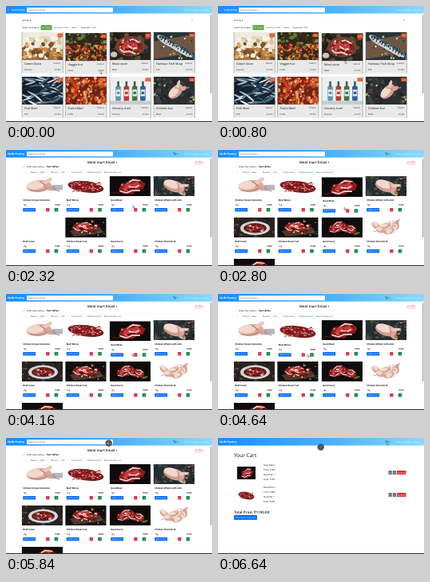
An HTML page for the animation above (8 s loop, 258 px wide and 146 px high).

```html
<!DOCTYPE html>
<html lang="en">
<head>
<meta charset="utf-8">
<title>Grocery shop demo</title>
<style>
html, body { margin: 0; width: 100%; height: 100%; overflow: hidden; background: #fff; }
svg { display: block; }
#stage { width: 100vw; height: 100vh; }
text { font-family: "Open Sans", "Noto Sans", sans-serif; text-rendering: geometricPrecision; }
</style>
</head>
<body>
<svg id="stage" viewBox="0 0 258 146"></svg>
<script>
const LOOP = 8000, STEP = 80;
const INK = '#101214', BLUE = '#0d6efd', RED = '#dc3545', GREEN = '#198754';

const rect = (x, y, w, h, fill, rx = 0, more = '') =>
  `<rect x="${x}" y="${y}" width="${w}" height="${h}" fill="${fill}" rx="${rx}" ${more}/>`;
const text = (x, y, size, str, fill = INK, more = '') =>
  `<text x="${x}" y="${y}" font-size="${size}" fill="${fill}" ${more}>${str}</text>`;
const oval = (x, y, rx, ry, fill, turn = 0) =>
  `<ellipse cx="${x}" cy="${y}" rx="${rx}" ry="${ry}" fill="${fill}" transform="rotate(${turn} ${x} ${y})"/>`;
const path = (d, fill, more = '') => `<path d="${d}" fill="${fill}" ${more}/>`;
const group = (id, body, more = '') => `<g id="${id}" ${more}>${body}</g>`;
const place = (x, y, k, turn, body) =>
  `<g transform="translate(${x} ${y}) rotate(${turn}) scale(${k})">${body}</g>`;
const END = 'text-anchor="end"', MID = 'text-anchor="middle"';
const BOLD = 'font-weight="700"', SEMI = 'font-weight="600"';

function scatter(seed, n, [x0, y0, x1, y1], size, colors, squash = 0.8, turn = 60) {
  const rnd = () => (seed = (seed * 16807) % 2147483647) / 2147483647;
  rnd();
  let out = '';
  for (let i = 0; i < n; i++) {
    const r = size * (0.6 + rnd() * 0.6);
    out += oval((x0 + rnd() * (x1 - x0)).toFixed(1), (y0 + rnd() * (y1 - y0)).toFixed(1),
      r.toFixed(1), (r * squash).toFixed(1), colors[i % colors.length], Math.round((rnd() - 0.5) * turn));
  }
  return out;
}

// Pictures are painted in a 50 x 30 box and stretched to their frame.
const back = fill => rect(0, 0, 50, 30, fill);
const FLESH = ['#e3b5aa', '#f4dcd3', '#d7a195', '#eecabf'];
const MEAT = ['#a32324', '#c8443c', '#5e1214', '#e8c4b8', '#7c1518'];
const bird = (x, y, k, turn = 0) => place(x, y, k, turn,
  oval(0, 0, 11, 6.5, '#d9aea0') + oval(-3, -1.5, 8, 4.5, '#f2d8cd') +
  oval(9, 3, 6, 2.8, '#d7a598', 25) + oval(8, -4.5, 5.5, 2, '#ebc8bc', -30) +
  path('M-9 3Q-1 7 7 3M1-5Q5-2 6 2M12 5L17 8', 'none', 'stroke="#bd8779" stroke-width="1"'));
const cut = (x, y, k, turn = 0) => place(x, y, k, turn,
  path('M-13 3L-9-5L-3-4L2-9L8-7L13-1L10 5L4 5L0 9L-9 8Z', '#8d1b1e') +
  path('M-9 2L-5-4L1-3L6-5L9 1L3 4L-2 2L-5 6Z', '#c23c38') +
  path('M-12 4L-6 7L0 5L7 6M-4-4L2-7L9-5M-3 0L3 2L7 0', 'none', 'stroke="#efd8d0" stroke-width="1.5"') +
  scatter(43, 10, [-9, -5, 9, 6], 1.2, ['#4e0e12', '#e6a59b', '#a32427']));
const striped = (x, y, k, turn) => place(x, y, k, turn,
  oval(0, 0, 14, 4, '#cfd6d8') + path('M-13-1Q0-8 13-1L18-4V4L12 0Z', '#47606f') +
  path('M-7-3V2M-3-4V2M1-4V2M5-4V2M9-3V1', 'none', 'stroke="#20323e" stroke-width="1.3"') +
  oval(-10, 0, 1, 1, '#111'));

const PICTURES = {
  pantry: () => back('#f0eadf') + rect(0, 17, 50, 13, '#a3713f') +
    scatter(5, 24, [3, 3, 48, 13], 2.6, ['#f9f5ea', '#d8c49d', '#e6d7b7', '#b8b078']) +
    scatter(21, 62, [1, 12, 49, 29], 2.7, ['#c78c45', '#efe3c8', '#84532b', '#dfb35e', '#f5efdf', '#6b4a2c']),
  veggies: () => back('#38251a') +
    scatter(8, 60, [0, 0, 50, 13], 2.2, ['#2c4023', '#5f7a36', '#1b2917', '#8c8752', '#3b3023']) +
    scatter(33, 170, [0, 13, 50, 30], 1.5, ['#c43a20', '#e0692c', '#8d2416', '#e5a052', '#54301d', '#6c7a33']),
  steak: () => back('#2b241f') + scatter(3, 36, [0, 0, 50, 30], 2.6, ['#49542f', '#1d1a18', '#69503b', '#39302a']) +
    oval(25, 15, 18, 11, '#6d4430') + cut(25, 15, 1.15, 12) +
    scatter(12, 26, [11, 7, 39, 24], 1, ['#f0d9c2', '#6a1011', '#748b44', '#d88b70']) +
    oval(5, 24, 4, 3, '#cfc6b3') + oval(46, 5, 3, 2.5, '#b8452b'),
  chopping: () => back('#27343b') + path('M0 10L50 2V22L0 29Z', '#6d5643') +
    [0, 1, 2].map(i => striped(16 + i * 10, 10 + i * 5, 0.95, 28)).join('') +
    scatter(9, 22, [1, 2, 49, 29], 1.3, ['#d46b34', '#e4c45b', '#56773b', '#f2f0e9', '#15212a']),
  fish: () => back('#18242e') +
    scatter(17, 85, [0, 1, 50, 29], 6.5, ['#4c6f87', '#a9c0cc', '#1c303f', '#e1e8ea', '#315a77', '#101b24'], 0.14, 80),
  tomatoes: () => back('#6a2415') +
    scatter(41, 170, [0, 0, 50, 30], 1.9, ['#cf3b20', '#ea6a33', '#94220f', '#f0a15f', '#be4b23'], 0.9) +
    scatter(6, 44, [0, 0, 50, 30], 1, ['#5e7a34', '#f4dccb', '#45301c']),
  bottles: () => back('#eef0ef') + rect(0, 26, 50, 4, '#c9cccb') +
    ['#5f98b8', '#b63c34', '#3c7850', '#315f9d'].map((c, i) => {
      const x = 7 + i * 10;
      return rect(x, 10, 6.5, 16, c, 1.3) + rect(x + 2, 5, 2.5, 6, '#4b555b', 0.6) +
        rect(x + 0.6, 14, 5.3, 7, '#f5f5ef') + rect(x + 1.5, 16, 3.5, 3, c);
    }).join(''),
  slate: () => back('#2b2f32') + scatter(7, 30, [0, 0, 50, 30], 3, ['#34393d', '#222629', '#3d4245']) +
    bird(27, 16, 0.9, -40) + scatter(11, 16, [1, 2, 14, 28], 1.3, ['#617d3d', '#a1412d', '#c5bd83', '#171a1c']) +
    scatter(18, 7, [39, 20, 49, 29], 1.3, ['#6f8545', '#d4c584']),
  breast: () => back('#fff') + bird(21, 15, 1.4, -8) + rect(37, 13, 13, 8, '#a0a0a0', 0, 'opacity=".75"'),
  mince: () => back('#fff') + oval(25, 16, 22, 8.5, '#7c191c', 10) +
    scatter(29, 130, [7, 9, 43, 23], 1.4, ['#b52f30', '#6e1418', '#d9847b', '#991f23', '#f0c5bd'], 0.5),
  goat: () => back('#0d0b0c') + cut(27, 15, 1.3, -8) + oval(8, 25, 6, 1.5, '#351214'),
  whole: () => back('#272c31') + scatter(19, 40, [0, 0, 50, 30], 2.2, ['#394247', '#1c2124', '#465339', '#303b43']) +
    bird(25, 15, 1.25, 25) + scatter(4, 14, [36, 2, 49, 28], 1.4, ['#67813d', '#a94b34', '#8f9b72']),
  bowl: () => back('#2a2320') + scatter(2, 24, [0, 0, 50, 30], 2.2, ['#34465a', '#5f4939', '#1a1717', '#4f6235']) +
    oval(26, 16, 18, 10.5, '#d5d8dc') + oval(26, 16, 14, 7.5, '#5b241f') +
    scatter(23, 40, [15, 11, 37, 21], 1.9, MEAT),
  roast: () => back('#120f10') + path('M5 20L42 14L47 23L11 29Z', '#4a382c') + cut(22, 14, 1, 15) +
    scatter(31, 24, [14, 10, 42, 23], 2.1, MEAT) +
    scatter(13, 16, [2, 2, 48, 28], 1.1, ['#56793a', '#e8d9c9', '#b33526']),
  curry: () => back('#0e0c0d') + cut(19, 14, 0.9, -20) + cut(33, 17, 0.8, 30) +
    scatter(37, 16, [13, 10, 39, 23], 1.6, MEAT) + oval(43, 24, 4, 1.6, '#567137', -20),
  pieces: () => back('#fff') + [0, 1, 2, 3, 4].map(i =>
    bird(13 + i * 6, 12 + (i % 2) * 7, 0.62, 50 - i * 35)).join('') +
    scatter(15, 12, [10, 9, 40, 22], 2, FLESH, 0.5)
};
const picture = (x, y, w, h, name) =>
  `<svg x="${x}" y="${y}" width="${w}" height="${h}" viewBox="0 0 50 30" preserveAspectRatio="none">${PICTURES[name]()}</svg>`;

const columns = [20, 74.5, 130, 185];
const shops = [
  ['Green Store', 'pantry', 'Grocery'], ['Veggie hut', 'veggies', 'Fruits'],
  ['Meat store', 'steak', 'Meat'], ['Harbour Fish Shop', 'chopping', 'Fish'],
  ['Fish Mart', 'fish', 'Fish'], ['Fruits Mart', 'tomatoes', 'Fruits'],
  ['Grocery mart', 'bottles', 'Grocery'], ['Chicken hut', 'slate', 'Meat']
];
const products = [
  ['Chicken breast boneless', 'breast', 260], ['Beef Mince', 'mince', 400], ['Goat Meat', 'goat', 700],
  ['Chicken Whole with skin', 'whole', 240], ['Beef Curry', 'bowl', 380], ['Chicken Roast Cut', 'roast', 290],
  ['Goat Curry', 'curry', 650], ['Chicken Drumstick', 'pieces', 270], ['Goat Leg', 'goat', 720]
];

const shopCard = ([name, image, kind], i) => {
  const x = columns[i % 4], y = i < 4 ? 33 : 89;
  return group('shop' + i,
    rect(x, y, 51.5, 51.5, '#e9e9e9') +
    picture(x, y, 51.5, 35, image) +
    path(`M${x} ${y}v51.5M${x + 51.5} ${y}v51.5`, 'none', 'stroke="#77797b" stroke-width=".5"') +
    rect(x + 44.5, y + 1.5, 6.5, 4.5, '#f4511e', 0.5) + text(x + 47.7, y + 4.8, 2.5, '4.5', '#fff', MID) +
    text(x + 3, y + 40.6, 3.8, name, INK, 'font-weight="500"') + text(x + 48.5, y + 40.3, 2.6, '9:00-21', INK, END) +
    text(x + 3, y + 47.6, 2.6, kind) + text(x + 48.5, y + 47.6, 2.6, '2.5 km', INK, END));
};

const productCard = ([name, image, price], i) => {
  const x = columns[i % 4] + 1.2, y = 33 + Math.floor(i / 4) * 52;
  return group('item' + i,
    group('pic' + i, picture(x - 1.5, y, 51.5, 25, image)) +
    text(x, y + 31, 2.8, name, INK, BOLD) +
    text(x, y + 36.5, 2.8, '1kg') + text(x + 46.5, y + 36.5, 2.8, '₹' + price, INK, END + ' ' + SEMI) +
    rect(x, y + 40, 16, 4.6, BLUE, 0.7) + text(x + 8, y + 43.3, 2.4, 'Add to Cart', '#fff', MID) +
    rect(x + 29, y + 40, 4.2, 4.6, RED, 0.6) + text(x + 31.1, y + 43.5, 3, '−', '#fff', MID) +
    rect(x + 39.5, y + 40, 4.6, 4.6, GREEN, 0.6) + text(x + 41.8, y + 43.5, 3, '+', '#fff', MID) +
    group('count' + i, text(x + 36.4, y + 43.4, 2.8, '1', INK, MID), 'display="none"'));
};

const cartRow = (y, name, image, price) =>
  picture(24, y + 3, 23, 16, image) +
  [name, 'Price: ₹' + price, 'Quantity: 1', 'Total: ₹' + price].map((s, i) =>
    text(57, y + 2 + i * 5.9, 2.8, s)).join('') +
  rect(213.5, y + 8, 4.3, 5, '#6c757d', 0.6) + text(215.6, y + 11.7, 3, '+', '#fff', MID) +
  rect(218.8, y + 8, 4.3, 5, '#6c757d', 0.6) + text(221, y + 11.7, 3, '−', '#fff', MID) +
  rect(224, y + 8, 11.5, 5, RED, 0.6) + text(229.7, y + 11.5, 2.5, 'Remove', '#fff', MID);

const filters = (x, y, gap, names, fill) => names.map((n, i) => text(x + i * gap, y, 2.6, n, fill)).join('');

const home = text(20, 18.6, 2.8, 'Sort by ▾') + text(233, 18.5, 3, '×', INK, MID) +
  rect(20, 21.5, 216, 0.2, '#ececec') +
  text(20, 28, 2.7, 'Select shop type:') +
  rect(43.5, 24, 14, 6.2, '#5cab46', 0.5) + text(50.5, 28, 2.7, 'All shops', '#fff', MID) +
  filters(60.5, 28, 11, ['Grocery', 'Fruits', 'Meat', 'Vegetables'], '#333') + text(108, 28, 2.6, 'Fish', '#333') +
  shops.map(shopCard).join('');

const heading = text(102, 16.8, 4.3, 'Meat mart Email', INK, SEMI) + oval(138.5, 15.6, 0.6, 0.6, INK) +
  text(247, 16.3, 2.8, 'Go Back', RED, END + ' text-decoration="underline"') +
  text(20, 21.8, 3, '←') + text(26, 21.8, 2.8, 'Filters (by name)') + text(51, 21.8, 3.1, 'Sort After', INK, BOLD) +
  rect(20, 24, 218, 0.2, '#e4e4e4') + text(23, 28.7, 2.8, '⋮') +
  filters(30, 28.7, 13, ['Chicken', 'Beef', 'Mutton', 'Fish', 'Goat meat'], '#24577c') +
  filters(101, 28.7, 22, ['Chicken breast', 'Beef boneless cut'], '#24577c');

const cart = text(20, 23.8, 6.5, 'Your Cart') +
  cartRow(33, 'Goat Meat', 'goat', 700) + cartRow(61, 'Beef Mince', 'mince', 400) +
  text(20, 95, 4.5, 'Total Price: ₹1100.00', INK, SEMI) +
  rect(20, 97, 29, 6, BLUE, 0.8) + text(34.5, 101, 2.6, 'Proceed to Checkout', '#fff', MID);

document.getElementById('stage').innerHTML =
  `<defs><linearGradient id="sky"><stop stop-color="#168cff"/><stop offset=".5" stop-color="#45adfb"/>
   <stop offset="1" stop-color="#8bd9ff"/></linearGradient></defs>` +
  rect(0, 0, 258, 146, '#fff') +
  group('home', home) + group('heading', heading) +
  group('products', products.map(productCard).join('')) + group('cart', cart) +
  rect(0, 0, 258, 9.5, 'url(#sky)') +
  group('homeBrand', text(2, 6.2, 3.4, '←', '#fff') + text(7, 6.2, 2.9, 'Swift Pantry', '#fff', SEMI)) +
  group('brand', text(2, 6.3, 3.4, 'Swift Pantry', '#fff', BOLD)) +
  group('search', rect(26, 2, 108, 6, '#fff', 0.8) + text(28, 6, 2.7, 'Search for shops', '#555')) +
  group('basket', path('M209 3.3h1l.6 2.2h2.2l.5-1.5h-3M210.8 6.5h.4M212.3 6.5h.4', 'none', 'stroke="#244f70" stroke-width=".5"') +
    '<text id="total" x="214.5" y="6.3" font-size="2.7" fill="#244f70"></text>') +
  text(223, 6.2, 2.7, 'Hello, Shopper | Logout', '#effaff') +
  group('scrollbar', rect(256.2, 11, 1.1, 99, '#929292', 0.5)) +
  rect(0, 145, 258, 1, '#333') +
  group('close', oval(0, 0, 4.2, 4.2, '#50565d') + path('M-1-1L1 1M1-1L-1 1', 'none', 'stroke="#8b9197" stroke-width=".4"')) +
  group('cursor', path('M0 0V3.2L.8 2.5L1.4 3.8L2 3.5L1.4 2.3H2.4Z', '#fff', 'stroke="#222" stroke-width=".35"'));

const $ = id => document.getElementById(id);
const show = (id, on) => $(id).setAttribute('display', on ? 'inline' : 'none');
const move = (id, x, y) => $(id).setAttribute('transform', `translate(${x} ${y})`);
const within = (t, a, b) => t >= a && t < b;

function track(keys, t) {
  let i = 0;
  while (i < keys.length - 2 && t >= keys[i + 1][0]) i++;
  const [t0, ...a] = keys[i], [t1, ...b] = keys[i + 1];
  const k = Math.min(1, Math.max(0, (t - t0) / (t1 - t0)));
  const eased = k * k * (3 - 2 * k);
  return a.map((v, j) => v + (b[j] - v) * eased);
}

const pointer = [[0, 118, 82], [400, 138, 77], [640, 150, 73], [800, 159, 69], [2240, 159, 69], [2560, 158, 72],
  [4320, 158, 75], [4640, 112, 76], [4800, 83, 75], [5600, 83, 75], [5840, 127, 5], [6080, 211, 5], [8000, 211, 5]];
const closeDrop = [[5680, -5], [5840, 6.5], [6000, 11.5]];

function update(time) {
  const t = Math.floor((time % LOOP) / STEP) * STEP;
  const atHome = t < 1280, inCart = t >= 6640;
  show('home', atHome);
  show('homeBrand', atHome);
  show('brand', !atHome);
  show('heading', within(t, 1280, 6640));
  show('products', within(t, 2320, 6640));
  show('cart', inCart);
  show('search', !inCart);
  show('basket', !atHome);
  show('scrollbar', atHome || within(t, 2320, 6640));
  $('total').textContent = t < 3600 ? 0 : t < 5280 ? 1 : 2;

  move('shop1', 0, t < 400 ? 1.2 : 0);
  move('shop2', 0, within(t, 640, 1280) ? 1.2 : 0);
  move('item2', 0, within(t, 2560, 4400) ? 1.2 : 0);
  move('item1', 0, within(t, 4480, 5760) ? 1.2 : 0);
  show('count2', t >= 3600);
  show('count1', t >= 5280);
  [4, 6, 7].forEach((n, i) => show('pic' + n, t >= 2400 + i * STEP));
  show('item8', t >= 2400);

  move('cursor', ...track(pointer, t));
  show('close', t >= 5680);
  move('close', 128.7, track(closeDrop, t)[0]);
}

const start = performance.now();
function frame(now) {
  update(Math.max(0, now - start));
  requestAnimationFrame(frame);
}
frame(start);
</script>
</body>
</html>
```
